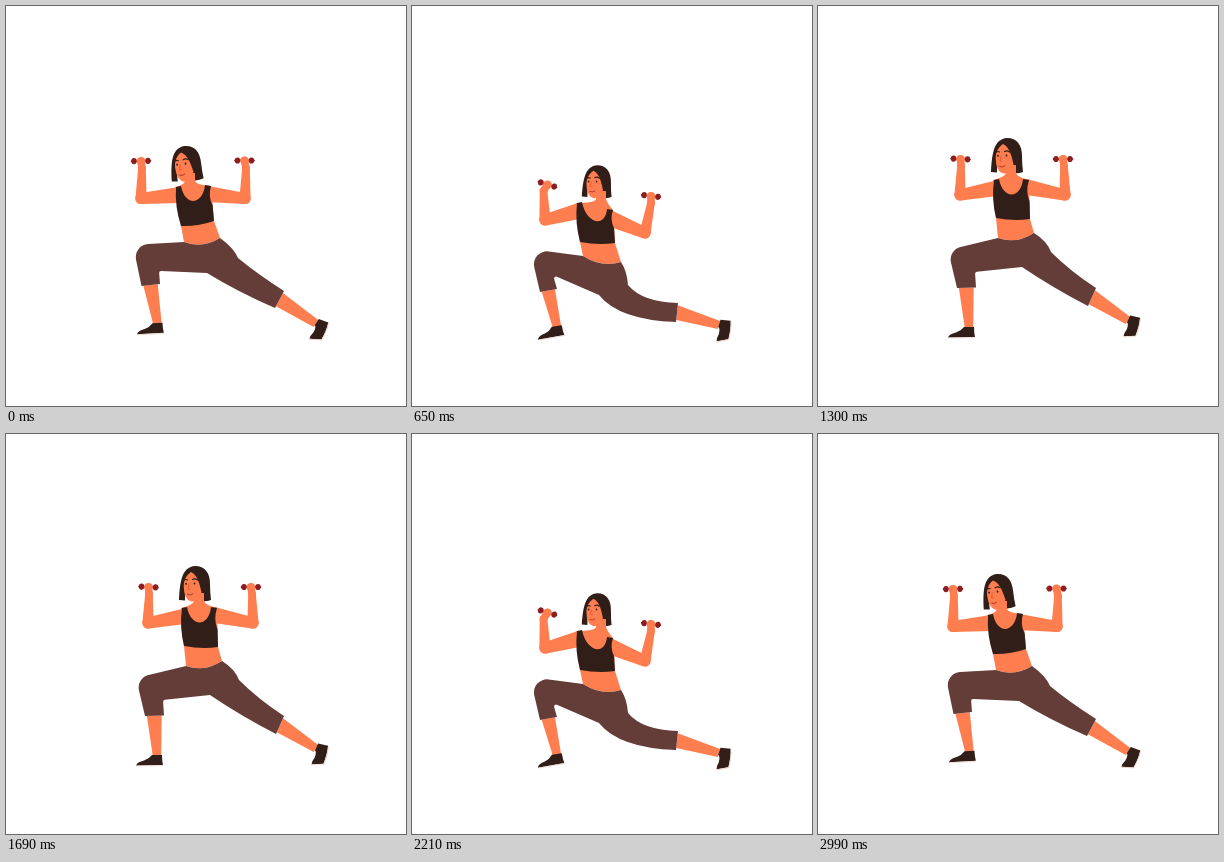
Recreate the animation shown at these times as an HTML page with a canvas. Size 400 by 400 pixels, loop 3.12 s.

```html
<!DOCTYPE html>
<html lang="en">
<head>
<meta charset="utf-8">
<title>Lunge with dumbbells</title>
<style>
html, body { margin: 0; width: 100%; height: 100%; overflow: hidden; background: #fff; }
canvas { display: block; width: 100vmin; height: 100vmin; }
</style>
</head>
<body>
<canvas id="stage" width="400" height="400"></canvas>
<script>
const ctx = document.getElementById('stage').getContext('2d');
const SKIN = '#ff7e50', DARK = '#321e18', PANTS = '#643d38', RED = '#8c1d20', SOLE = '#ecd8cc';
const STEP = 130;

// Key poses sit at these steps of the lunge; the rest are interpolated.
const KEYS = [0, 1, 3, 5];

// Each joint: x, y for every key pose.
const HEAD = { at: [180, 157, 189, 149, 193, 151, 185, 175], tilt: [-.1, 0, 0, .02], size: [1, 1, 1, .93] };
const TORSO = {
  sl: [169, 181, 175, 174, 178, 175, 164, 197],
  sr: [205, 180, 211, 174, 212, 178, 201, 204],
  tl: [175, 220, 178, 212, 178, 213, 168, 236],
  tr: [208, 215, 212, 213, 213, 214, 203, 237]
};
const ARMS = [
  { shoulder: [173, 189, 180, 182, 182, 183, 167, 205], elbow: [135, 192.5, 142, 189, 147, 192, 133, 214],
    wrist: [136, 162, 143, 160, 146, 163, 131.5, 185], hand: [135, 155, 142.5, 153, 146.5, 156, 135.5, 178.5],
    tilt: [-.02, .04, .2, .3] },
  { shoulder: [201, 188, 208, 181, 208, 187, 197, 212], elbow: [239, 192.5, 247, 189, 244, 200, 233, 227],
    wrist: [240, 162, 246, 160, 250, 170, 239, 197], hand: [238.5, 154.5, 245, 153, 249, 162.5, 239, 190],
    tilt: [0, 0, -.03, .12] }
];
const LEGS = {
  waistL: [178, 236, 180, 232, 180, 232, 171, 250],
  waistR: [214, 232, 216, 227, 217, 231, 209, 256],
  knee: [127, 239, 130, 244, 127, 246, 118, 243],
  shinF: [135.5, 280, 139, 282, 138, 283, 128, 286],
  shinB: [154, 278, 158, 281.5, 156, 281.5, 145, 283],
  crook: [153, 265, 157, 266, 154, 266, 141, 269],
  crotch: [201, 267, 204, 261, 202, 264, 187, 289],
  under: [232, 286, 235, 282, 232, 285, 207, 314],
  cuffLow: [269, 302, 270, 300, 267, 304, 264, 316],
  cuffTop: [278, 285, 278, 282, 276, 287, 266, 297],
  thigh: [250, 267, 252, 265, 250, 267, 230, 296],
  hip: [232, 252, 233, 246, 233, 249, 216, 279],
  seat: [228, 242, 229, 235, 229, 239, 215, 265]
};
const FEET = {
  front: [151.5, 318, 151, 322, 148, 322, 145, 321],
  frontTilt: [-.04, 0, 0, -.16],
  rear: [310, 317.5, 310, 314.5, 310, 316.5, 307, 319],
  rearTilt: [.16, .03, 0, -.1]
};

let weights;
const weigh = s => KEYS.map(k => KEYS.reduce((w, q) => q === k ? w : w * (s - q) / (k - q), 1));
const num = a => a.reduce((sum, v, i) => sum + v * weights[i], 0);
const pt = a => [num(a.filter((_, i) => i % 2 === 0)), num(a.filter((_, i) => i % 2))];
const solve = joints => Object.fromEntries(Object.entries(joints).map(([k, a]) => [k, pt(a)]));
const mix = (p, q, f) => [p[0] + (q[0] - p[0]) * f, p[1] + (q[1] - p[1]) * f];
const off = (p, x, y) => [p[0] + x, p[1] + y];

function fill(color, trace) {
  ctx.fillStyle = color;
  ctx.beginPath();
  trace();
  ctx.closePath();
  ctx.fill();
}
const move = p => ctx.moveTo(...p);
const line = (...ps) => ps.forEach(p => ctx.lineTo(...p));
const quad = (c, p) => ctx.quadraticCurveTo(...c, ...p);
const shape = (color, d) => { ctx.fillStyle = color; ctx.fill(new Path2D(d)); };
const stroke = (color, width, d) => {
  ctx.strokeStyle = color;
  ctx.lineWidth = width;
  ctx.lineCap = 'round';
  ctx.stroke(new Path2D(d));
};
const disc = (color, [x, y], rx, ry = rx) => fill(color, () => ctx.ellipse(x, y, rx, ry, 0, 0, 7));

function local([x, y], angle, scale, draw) {
  ctx.save();
  ctx.translate(x, y);
  ctx.rotate(angle);
  ctx.scale(scale, scale);
  draw();
  ctx.restore();
}

function taper(p, q, r1, r2) {
  const a = Math.atan2(q[1] - p[1], q[0] - p[0]) + Math.PI / 2;
  const c = Math.cos(a), s = Math.sin(a);
  fill(SKIN, () => {
    move(off(p, c * r1, s * r1));
    line(off(q, c * r2, s * r2), off(q, -c * r2, -s * r2), off(p, -c * r1, -s * r1));
  });
  disc(SKIN, p, r1);
  disc(SKIN, q, r2);
}

function calf(a, b, ankle, r) {
  const m = mix(a, b, .5);
  const t = Math.atan2(ankle[1] - m[1], ankle[0] - m[0]) + Math.PI / 2;
  const x = Math.cos(t) * r, y = Math.sin(t) * r;
  fill(SKIN, () => {
    move(mix(a, b, .1));
    line(off(ankle, x, y), off(ankle, -x, -y), mix(a, b, .88));
  });
}

function drawLegs(l) {
  const front = pt(FEET.front), rear = pt(FEET.rear);
  calf(l.shinF, l.shinB, front, 4.2);
  calf(l.cuffLow, l.cuffTop, rear, 4.2);
  local(front, num(FEET.frontTilt), 1, () => {
    shape(DARK, 'M-5-1L5-1Q5 5 6 9L-21 9.5Q-20 6 -13 4.5Q-8 3 -5-1Z');
    stroke(SOLE, .8, 'M-20 10L6 9.6');
  });
  local(rear, num(FEET.rearTilt), 1, () => {
    shape(DARK, 'M2-5L12-3Q12 4 8 15L-4 16Q-4 13 -1 9Q1 3 -1 2Z');
    stroke(SOLE, 1, 'M12.3-2Q12 5 8.3 15.4L-4 16.6');
  });
  fill(PANTS, () => {
    move(l.waistL);
    ctx.arcTo(...l.knee, ...l.shinF, 13);
    line(l.shinF, l.shinB);
    ctx.arcTo(...l.crook, ...l.crotch, 2);
    line(l.crotch);
    quad(l.under, l.cuffLow);
    line(l.cuffTop);
    quad(l.thigh, l.hip);
    quad(l.seat, l.waistR);
    quad(off(mix(l.waistL, l.waistR, .5), 0, 9), l.waistL);
  });
}

function drawTorso(t, l, head) {
  const neck = off(head, 4, 13);
  fill(SKIN, () => {
    move(off(neck, -5, -3));
    line(off(neck, -5, 5));
    quad(off(neck, -6, 9), t.sl);
    line(t.tl, l.waistL);
    quad(off(mix(l.waistL, l.waistR, .5), 0, 9), l.waistR);
    line(t.tr, t.sr);
    quad(off(neck, 6, 9), off(neck, 5, 5));
    line(off(neck, 5, -3));
  });
  const strapL = off(t.sl, 6, -1), strapR = off(t.sr, -6, -1);
  fill(DARK, () => {
    move(off(t.sl, 1, 0));
    quad(off(mix(t.sl, t.tl, .45), -3, 2), t.tl);
    quad(off(mix(t.tl, t.tr, .5), 1, 3), t.tr);
    line(off(mix(t.sr, t.tr, .55), 0, 0));
    quad(off(mix(t.sr, t.tr, .3), -4, 0), t.sr);
    line(strapR);
    ctx.bezierCurveTo(...off(strapR, -2, 20), ...off(strapL, 4, 21), ...strapL);
  });
}

function drawArm(arm) {
  const elbow = pt(arm.elbow), wrist = pt(arm.wrist), hand = pt(arm.hand);
  taper(pt(arm.shoulder), elbow, 8, 5.6);
  taper(elbow, wrist, 5.6, 3.8);
  taper(wrist, hand, 3.8, 3.8);
  local(hand, num(arm.tilt), 1, () => {
    stroke(RED, 1.8, 'M-9.4 0L9.4 0');
    disc(RED, [-7, 0], 2.7, 3.1);
    disc(RED, [7, 0], 2.7, 3.1);
    disc(SKIN, [0, 0], 4.4, 4);
  });
}

function drawHead(at) {
  local(at, num(HEAD.tilt), num(HEAD.size), () => {
    shape(DARK, 'M-16 17C-15-2-13-16 0-17C10-17 15-10 15 1Q15 9 16 17Q11 19 6 18L5 8L-10 8L-10 17.5Z');
    shape(SKIN, 'M-4-11C-10-7-12 0-11 6C-11 12-8 18-3 18.5C2 18.5 6 14 6.5 9C5 3 3-8-4-11Z');
    stroke(DARK, 1.2, 'M-10.5-3Q-9-4-7.5-3M-2.5-3.5Q0-5 2.5-3');
    disc(DARK, [-9, .8], .9, 1.1);
    disc(DARK, [-.5, .5], .9, 1.1);
    stroke('#d8502c', .7, 'M-6 1L-7 6L-5 6.5');
    stroke('#a82d22', .9, 'M-7.5 11.5Q-5 13-2 10.8');
  });
}

function draw(step) {
  weights = weigh(step);
  ctx.fillStyle = '#fff';
  ctx.fillRect(0, 0, 400, 400);
  const legs = solve(LEGS), torso = solve(TORSO), head = pt(HEAD.at);
  ARMS.forEach(drawArm);
  drawHead(head);
  drawTorso(torso, legs, head);
  drawLegs(legs);
}

// Six steps down, six steps back up, the end poses held twice as long.
const start = performance.now();
function tick() {
  const slot = Math.floor((performance.now() - start) / STEP) % 12;
  draw(slot < 6 ? slot : 11 - slot);
  requestAnimationFrame(tick);
}
tick();
</script>
</body>
</html>
```
